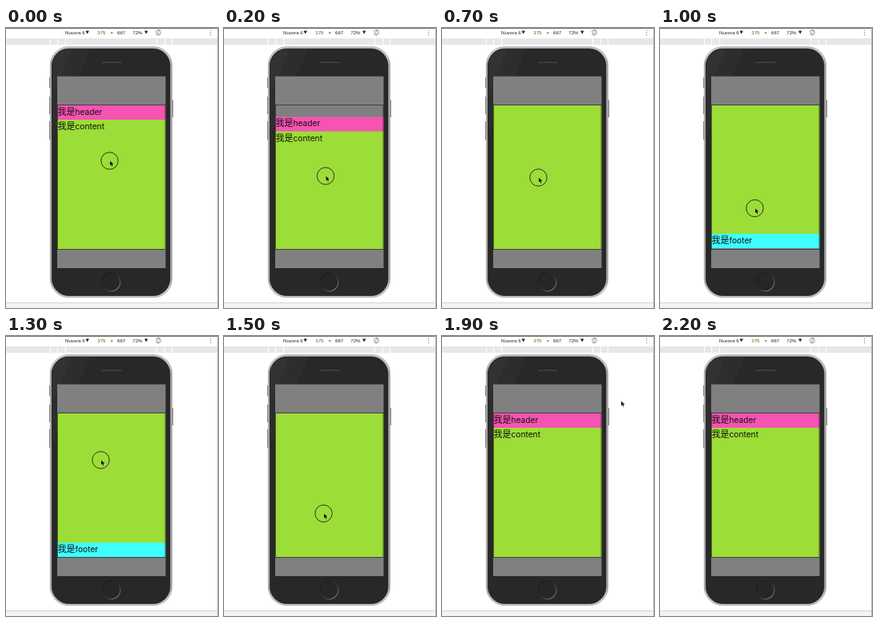
Write an HTML page that moves like this. It is 265 px wide and 351 px high and loops after 2400 ms.

```html
<!DOCTYPE html>
<html lang="zh">
<head>
<meta charset="utf-8">
<style>
  html, body { margin: 0; width: 100%; height: 100%; overflow: hidden; background: #fff; }
  svg { display: block; width: 265px; height: 351px; }
  .bar { font: 6.1px "Liberation Sans", Arial, sans-serif; fill: #222; }
  .list { font: 10.2px Inter, sans-serif; fill: #111; }
  .han { font: 11px "Noto Sans CJK SC", "Noto Sans CJK", sans-serif; }
</style>
</head>
<body>
<svg viewBox="0 0 265 351">
  <defs>
    <linearGradient id="rim">
      <stop offset="0" stop-color="#999"/><stop offset=".02" stop-color="#c4c4c4"/>
      <stop offset=".98" stop-color="#c4c4c4"/><stop offset="1" stop-color="#999"/>
    </linearGradient>
    <linearGradient id="ring" x2="1" y2="1">
      <stop offset=".2" stop-color="#1c1c1c"/><stop offset=".55" stop-color="#333"/><stop offset="1" stop-color="#888"/>
    </linearGradient>
    <clipPath id="view"><rect x="64" y="97" width="135.5" height="180"/></clipPath>
    <clipPath id="face"><rect x="57.5" y="26" width="147.5" height="309.5" rx="21"/></clipPath>
  </defs>

  <!-- toolbar and rulers -->
  <rect width="265" height="351" fill="#fff"/>
  <path d="M0 .5H265" stroke="#777"/>
  <rect y="13" width="265" height="8" fill="#e7e7e7"/>
  <path d="M55.5 13v8M64.5 13v8M74.5 13v8M188.5 13v8M198.5 13v8M207.5 13v8" stroke="#fff"/>
  <rect y="345" width="265" height="6" fill="#f3f3f3"/>
  <path d="M0 344.5H265" stroke="#d4d4d4"/>
  <path d="M264.5 0V351" stroke="#bbb"/>
  <g class="bar">
    <text x="74" y="7.6">Nuvora 6</text>
    <text x="114.3" y="7.6" fill="#560">375</text>
    <text x="130.4" y="7.8">×</text>
    <text x="139" y="7.6">667</text>
    <text x="158.3" y="7.6">72%</text>
    <path d="M99.5 3.5h4.400l-2.200 4zM173 3.5h4.400l-2.200 4z"/>
    <path d="M255.3 2.500h1v1h-1zM255.3 5.200h1v1h-1zM255.3 7.900h1v1h-1z" fill="#555"/>
  </g>
  <g fill="none" stroke="#555" stroke-width=".7">
    <path d="M187.500 4.500l2-2 4 4-2 2z"/>
    <path d="M190 2.200a3.300 3.300 0 0 1 3.500 2.300M191 9a3.300 3.300 0 0 1-3.500-2.300"/>
  </g>

  <!-- phone -->
  <path d="M54.700 62v13M54.700 86v22M54.700 117v23M208.300 90v22" stroke="#888" stroke-width="1.500"/>
  <rect x="55.3" y="23.5" width="152.200" height="314.200" rx="23" fill="url(#rim)" stroke="#999" stroke-width=".6"/>
  <rect x="57.5" y="26" width="147.5" height="309.5" rx="21" fill="#282828"/>
  <g clip-path="url(#face)">
    <path d="M57 25H106L57 138z" fill="#2d2d2d"/>
    <path d="M57 25H83L57 85z" fill="#323232"/>
  </g>
  <rect x="57.5" y="26" width="147.5" height="309.5" rx="21" fill="none" stroke="#1a1a1a" stroke-width=".7"/>
  <path d="M121 43q11-1.600 22 0" stroke="#4a4a4a" stroke-width="2" stroke-linecap="round" fill="none"/>
  <path d="M121 42.100q11-1.600 22 0" stroke="#151515" stroke-width=".8" fill="none"/>
  <circle cx="131.500" cy="318.500" r="11.300" fill="#262626" stroke="url(#ring)" stroke-width="1.200"/>

  <!-- screen -->
  <rect x="64" y="60.6" width="135.5" height="240.4" fill="#808080"/>
  <g clip-path="url(#view)">
    <g class="list" id="list">
      <rect x="64" y="97" width="136" height="18" fill="#f653b3"/>
      <rect x="64" y="115" width="136" height="544" fill="#9ddd37"/>
      <rect x="64" y="659" width="136" height="18" fill="#40ffff"/>
      <text x="64.500" y="108.700"><tspan class="han">我是</tspan>header</text>
      <text x="64.500" y="127.200"><tspan class="han">我是</tspan>content</text>
      <text x="64.500" y="670.700"><tspan class="han">我是</tspan>footer</text>
    </g>
  </g>
  <rect x="64.5" y="96.5" width="134.5" height="181" fill="none" stroke="#000" stroke-opacity=".5"/>

  <g id="pointer">
    <circle id="touch" cx="-.5" cy=".5" r="10.700" fill="none" stroke="#222" stroke-width=".9"/>
    <path d="M0 .5v6l1.400-1.300 1.100 2.500 1.100-.5-1.100-2.300h2z" fill="#000" stroke="#fff" stroke-opacity=".4" stroke-width=".4"/>
  </g>
</svg>
<script>
const $ = id => document.getElementById(id);
const END = 400; // scroll distance from header to footer

// step, scroll, pointer x, pointer y
const keys = [
  [0, 0, 130, 166],
  [4, -29, 125, 204],
  [5, -20, 124, 215],
  [6, 0, 122, 225],
  [7, 60, 121, 187],
  [8, 240, 120, 172],
  [9, END - 8, 119, 200],
  [10, END + 1, 119, 225.5],
  [12, END + 28, 119, 168],
  [13, END, 119, 155],
  [14, 250, 121, 190],
  [15, 70, 125, 222],
  [16, 0, 130, 238],
  [17, 0, 148, 234.5],
  [18, 0, 209, 130],
  [20, 0, 239, 32],
  [21, 0, 243, 5],
  [24, 0, 243, 5]
];

function pose(step) {
  const i = keys.findIndex(k => k[0] > step);
  const a = keys[i - 1], b = keys[i];
  const p = (step - a[0]) / (b[0] - a[0]);
  return a.map((v, j) => v + (b[j] - v) * p);
}

function draw(now) {
  const step = Math.min(22, Math.floor(now % 2400 / 100));
  const [, scroll, x, y] = pose(step);
  $("list").setAttribute("transform", `translate(0 ${-scroll})`);
  $("pointer").setAttribute("transform", `translate(${x} ${y})`);
  $("pointer").style.display = step < 22 ? "" : "none";
  $("touch").style.display = step < 17 ? "" : "none";
}

const start = performance.now();
function tick() {
  draw(performance.now() - start);
  requestAnimationFrame(tick);
}
tick();
</script>
</body>
</html>
```
